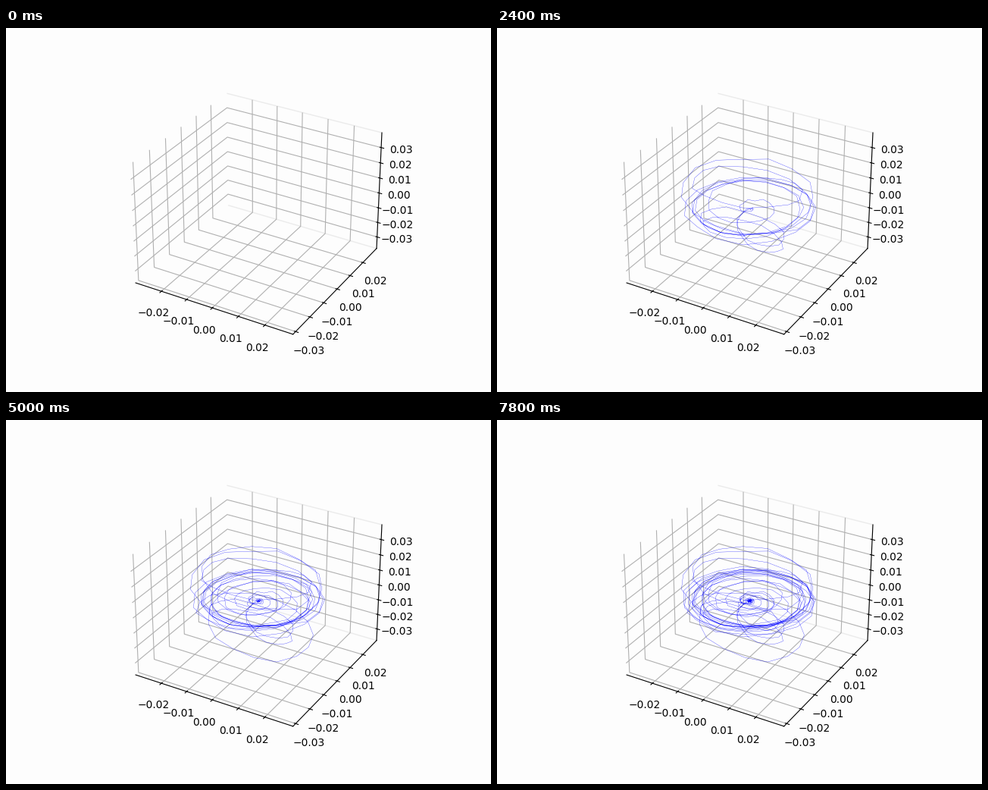
A matplotlib script for the animation above (8000 ms loop, 640 by 480 pixels).

```python
import numpy as np
import matplotlib.pyplot as plt
from matplotlib.animation import FuncAnimation

BACK = "#fdfdfd"
FRAMES, INTERVAL = 40, 200
TURNS_PER_FRAME = 1.2
POINTS_PER_TURN = 15
R_UNIT, Z_UNIT = 1 / 3850, 1 / 1991      # stage pixels to data units


def bell(t, center, width):
    return np.exp(-((t - center) / width) ** 2)


def orbit(rng, live, reach, dip, rise, fall):
    """A swirl that grows, dips below and climbs above its ring, then shrinks.

    dip and rise are (turn, height); fall is (turn, width) of the shrinking.
    """
    t = np.arange(0, live * TURNS_PER_FRAME, 1 / POINTS_PER_TURN)
    grow = 1 - bell(t, 0, 1.2)
    shrink = bell(np.maximum(t, fall[0]), *fall)
    size = grow * shrink

    a, b = rng.uniform(0, 2 * np.pi, 2)
    r = reach * size * (1 + 0.1 * np.sin(2.3 * t + a))
    r = 1.5 + r * (1 + 0.015 * rng.standard_normal(t.size))
    h = 5 * size * np.sin(1.8 * t + b) + rng.standard_normal(t.size)
    h += dip[1] * bell(t, dip[0], 0.45) + rise[1] * bell(t, rise[0], 0.5)

    angle = 2 * np.pi * t + np.pi / 6
    return np.array([r * R_UNIT * np.cos(angle),
                     r * R_UNIT * np.sin(angle),
                     h * Z_UNIT])


def set_axis(axis, set_lim, low, high, first, last):
    set_lim(low, high)
    axis.set_ticks(np.arange(first, last + 1) / 100)


fig = plt.figure(figsize=(6.4, 4.8), dpi=100, facecolor=BACK)
ax = fig.add_subplot(projection="3d")
ax.set_facecolor(BACK)
ax.view_init(elev=30, azim=-60)

rng = np.random.default_rng(4)
starts = [0, 8, 19, 30]
paths = [
    orbit(rng, 6, 77, dip=(1.05, -52), rise=(4.65, 42), fall=(4.8, 1.2)),
    orbit(rng, 9, 80, dip=(1.05, -42), rise=(3.35, 32), fall=(5.0, 1.8)),
    orbit(rng, 9, 74, dip=(2.95, -42), rise=(4.40, 32), fall=(5.0, 1.5)),
    orbit(rng, 9, 80, dip=(1.10, -33), rise=(4.40, 8), fall=(4.7, 1.3)),
]
lines = [ax.plot([], [], [], color="blue", lw=0.2)[0] for _ in paths]

set_axis(ax.xaxis, ax.set_xlim, -0.0304, 0.0304, -2, 2)
set_axis(ax.yaxis, ax.set_ylim, -0.0318, 0.0312, -3, 2)
set_axis(ax.zaxis, ax.set_zlim, -0.0380, 0.0396, -3, 3)

for axis in (ax.xaxis, ax.zaxis):
    axis.set_pane_color((1, 1, 1, 0))
wall = ax.yaxis.pane
wall.set_fill(False)
wall.set_alpha(1)
wall.set_edgecolor("#ebebeb")


def draw(frame):
    for line, path, start in zip(lines, paths, starts):
        steps = max(frame - start, 0)
        count = round(steps * TURNS_PER_FRAME * POINTS_PER_TURN)
        line.set_data_3d(*path[:, :count])
    return lines


def reset():
    return draw(0)


anim = FuncAnimation(fig, draw, frames=FRAMES, init_func=reset,
                     interval=INTERVAL, repeat=True, repeat_delay=0)
plt.show()
```
